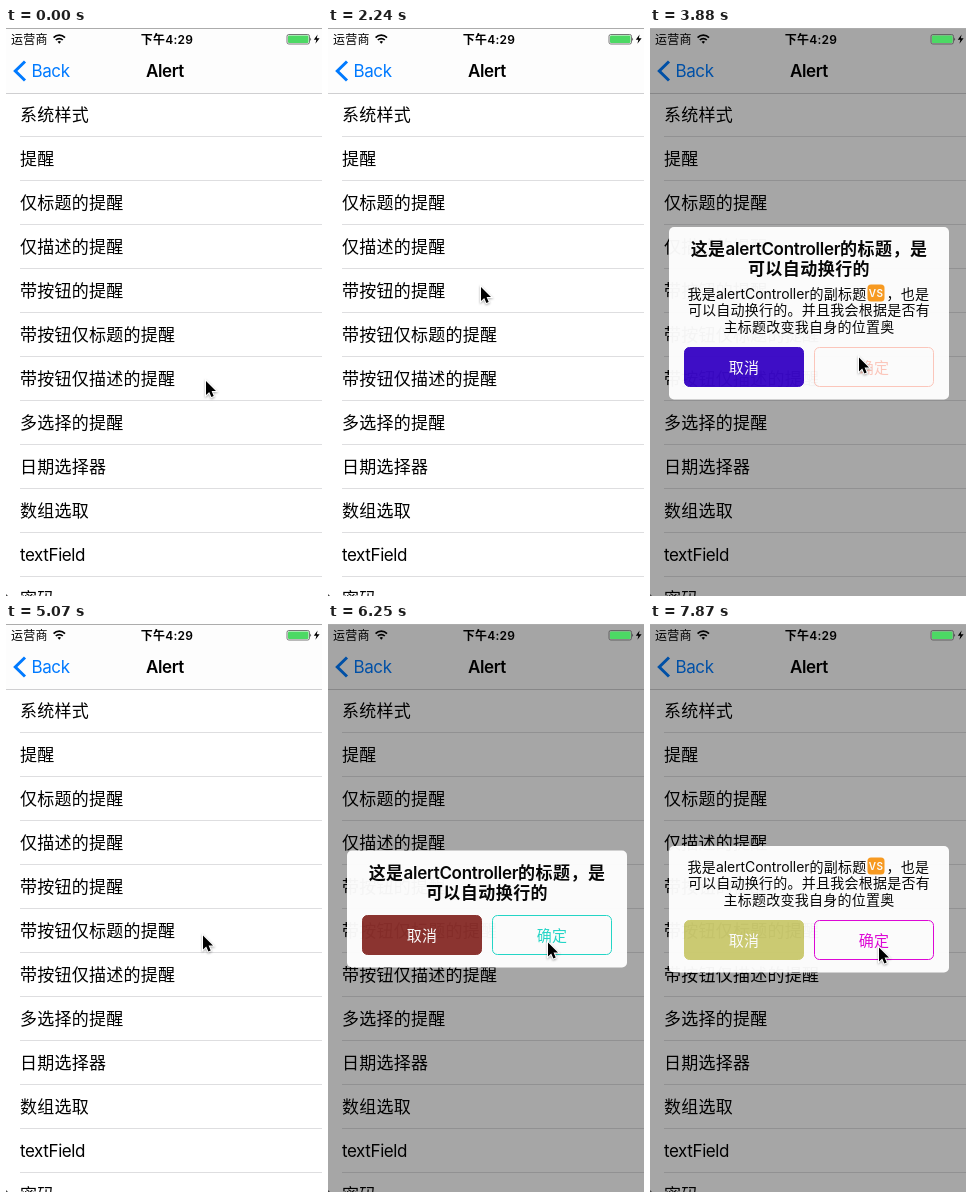
Write an HTML page that moves like this. It is 316 px wide and 568 px high and loops after 8000 ms.

```html
<!DOCTYPE html>
<html lang="zh-CN">
<head>
<meta charset="utf-8">
<style>
  html, body { margin: 0; width: 100%; height: 100%; overflow: hidden; background: #fff; }
  svg { display: block; }
  text { font: 17px "Inter", "Noto Sans CJK SC", "Noto Sans CJK", sans-serif; letter-spacing: .25px; }
  .en { letter-spacing: -.4px; }
  .title { font-weight: 600; }
  .headline { letter-spacing: .45px; }
  .headline .en { letter-spacing: -.3px; }
  .mid { text-anchor: middle; }
  .sub { font-size: 14px; }
  .sub .en { letter-spacing: -.08px; }
  .button { font-size: 15px; }
  .status { font-size: 12px; }
</style>
</head>
<body>
<svg width="316" height="568" viewBox="0 0 316 568">
  <rect width="316" height="568" fill="#fff"/>
  <g id="rows"></g>
  <rect width="316" height="65" fill="#fdfdfd"/>
  <rect y="65" width="316" height="1" fill="#cfcfd1"/>
  <path d="M19 33.5 9.3 43 19 52.5" fill="none" stroke="#007aff" stroke-width="3"/>
  <text class="en" x="25.5" y="49" fill="#007aff">Back</text>
  <text class="en title mid" x="159" y="49">Alert</text>
  <rect id="dim" width="316" height="568" fill-opacity=".35"/>
  <g id="alerts"></g>

  <text class="status" x="5" y="15.5">运营商</text>
  <g fill="none" stroke="#000" stroke-width="1.7">
    <path d="M47.6 9.6a8 8 0 0 1 11.4 0M49.8 12a4.9 4.9 0 0 1 7 0"/>
    <path d="M53.3 15.8l-1.7-2a2.4 2.4 0 0 1 3.4 0z" fill="#000" stroke="none"/>
  </g>
  <text class="status title mid" x="161" y="15.5">下午4:29</text>
  <rect x="281" y="6.5" width="22.5" height="9.5" rx="1.8" fill="none" stroke="#555" stroke-width=".8"/>
  <rect x="282" y="7.5" width="20.5" height="7.5" rx="1" fill="#4cd964"/>
  <path d="M304.3 9.5q1.8 1.8 0 3.6z" fill="#333"/>
  <path d="M311.6 6.5 307.8 11.8h2.6l-1 4 4.2-5.5h-2.8z"/>
  <rect width="316" height="1" fill="#acacac"/>
  <path d="M0 566l2 2H0z" fill="#444"/>

  <path id="cursor" d="M1 .5V14.5L4.2 11.5 6.4 16.5 8.7 15.5 6.6 10.6H11Z" stroke="#fff" stroke-width="2"
    paint-order="stroke" style="filter: drop-shadow(0 1px 1px #0005)"/>
</svg>
<script>
const $ = id => document.getElementById(id);
const LOOP = 8000, STEP = 148.4;

const markup = s => s.replace(/[A-Za-z]+/g, '<tspan class="en">$&</tspan>');
const text = (x, y, s, cls = '', fill = '#000') =>
  `<text x="${x}" y="${y}" class="${cls}" fill="${fill}">${markup(s)}</text>`;

const rows = ['系统样式', '提醒', '仅标题的提醒', '仅描述的提醒', '带按钮的提醒', '带按钮仅标题的提醒',
  '带按钮仅描述的提醒', '多选择的提醒', '日期选择器', '数组选取', 'textField', '密码'];
$('rows').innerHTML = rows.map((s, i) =>
  text(14, 93 + 44 * i, s) +
  `<rect x="14" y="${108 + 44 * i}" width="302" height="1" fill="#dedee0"/>`).join('');

const titleBlock = y =>
  text(159, y, '这是alertController的标题，是', 'title headline mid') +
  text(159, y + 20, '可以自动换行的', 'title headline mid');

const subBlock = y =>
  text(37.5, y, '我是alertController的副标题', 'sub') +
  `<rect x="217.5" y="${y - 14}" width="17" height="17" rx="3.5" fill="#fb9a1c"/>` +
  `<text x="226" y="${y - 2}" class="mid title" fill="#fff" style="font-size:10px">VS</text>` +
  text(236.5, y, '，也是', 'sub') +
  text(159, y + 16.7, '可以自动换行的。并且我会根据是否有', 'sub mid') +
  text(159, y + 33.4, '主标题改变我自身的位置奥', 'sub mid');

const button = (x, y, label, fill, ink, stroke) =>
  `<rect x="${x + .5}" y="${y + .5}" width="119" height="39" rx="5" fill="${fill}" stroke="${stroke}"/>` +
  text(x + 60, y + 25.7, label, 'button mid', ink);

// opens and closes are counted in steps
const alerts = [
  { opens: 18, closes: 29, top: 199, bottom: 371.5, title: 227, sub: 270.5, cancel: '#3a08c8', ok: '#ffc8bc' },
  { opens: 37, closes: 43, top: 226.5, bottom: 343.5, title: 255, cancel: '#8a2f2b', ok: '#1fd8c8' },
  { opens: 49, closes: 99, top: 222, bottom: 348.5, sub: 247.5, cancel: '#cdcc70', ok: '#e000d8' },
];
$('alerts').innerHTML = alerts.map(a => {
  const y = a.bottom - 52.5;
  return `<g><g opacity=".955">
    <rect x="19" y="${a.top}" width="280" height="${a.bottom - a.top}" rx="5" fill="#fff"/>
    ${a.title ? titleBlock(a.title) : ''}${a.sub ? subBlock(a.sub) : ''}
    ${button(34, y, '取消', a.cancel, '#fff', a.cancel)}${button(164, y, '确定', 'none', a.ok, a.ok)}
  </g></g>`;
}).join('');
const panels = [...$('alerts').children];

const visibility = (a, n) =>
  n < a.opens ? 0 :
  n < a.closes ? [.4, .9][n - a.opens] ?? 1 :
  [.5, .06][n - a.closes] ?? 0;

// [step, x, y]
const path = [
  [0, 199, 352.5], [1, 197.5, 350.5], [2, 197.5, 350.5], [5, 181, 262], [8, 157, 140], [10, 159, 122],
  [12, 141, 195], [14, 146, 279], [15, 152, 258.5], [18, 152, 259], [21, 172, 290], [25, 205.5, 330],
  [26, 208, 329], [29, 208, 329], [34, 196, 311], [37, 196, 311], [42, 219, 318], [44, 218, 319],
  [47, 192, 354], [49, 192, 354], [53, 228, 323],
];
function cursorAt(n) {
  const i = Math.max(1, path.findIndex(p => p[0] >= n));
  const [n0, x0, y0] = path[i - 1], [n1, x1, y1] = path[i];
  const k = (n - n0) / (n1 - n0);
  return [x0 + (x1 - x0) * k, y0 + (y1 - y0) * k];
}

function draw() {
  const n = Math.floor(performance.now() % LOOP / STEP);
  const shown = alerts.map(a => visibility(a, n));
  panels.forEach((p, i) => p.setAttribute('opacity', shown[i]));
  $('dim').setAttribute('opacity', Math.max(...shown));
  $('cursor').setAttribute('transform', `translate(${cursorAt(n)})`);
  requestAnimationFrame(draw);
}
draw();
</script>
</body>
</html>
```
